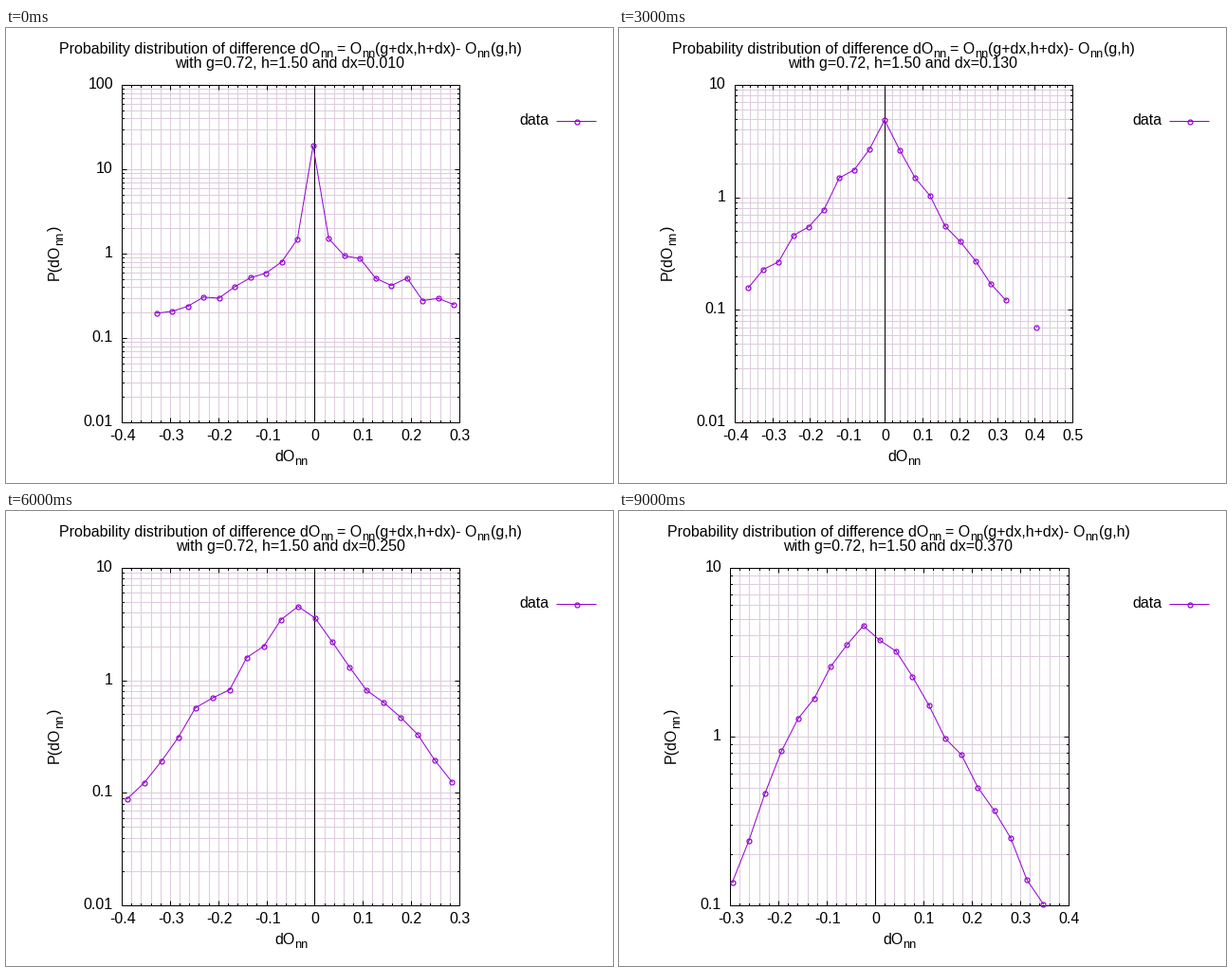
Recreate the animation shown at these times as a matplotlib script. Size 640 px wide and 480 px high, loop 10000 ms.

```python
import math
import random

import matplotlib.pyplot as plt
from matplotlib.animation import FuncAnimation

W, H, DPI = 640, 480, 80
PX = 72 / DPI                       # one pixel in points
TOP, BOTTOM, BINS = 60, 416, 20
GRID, VIOLET = "#ddccdd", "#9400d3"

# First bin, last bin, log10 of P at both, lowest decade shown
RUNS = [
    (-0.329, 0.288, -0.70, -0.60, -2),
    (-0.519, 0.352, -1.25, -1.09, -2),
    (-0.368, 0.364, -1.00, -1.00, -2),
    (-0.365, 0.402, -0.80, -1.15, -2),
    (-0.404, 0.307, -0.96, -0.81, -1),
    (-0.391, 0.393, -1.09, -1.17, -2),
    (-0.390, 0.284, -1.05, -0.90, -2),
    (-0.345, 0.292, -0.90, -0.80, -1),
    (-0.330, 0.360, -1.05, -1.05, -2),
    (-0.296, 0.347, -0.86, -0.99, -1),
]

plt.rcParams["font.family"] = "Liberation Sans"
fig = plt.figure(figsize=(W / DPI, H / DPI), dpi=DPI, facecolor="white")
ax = fig.add_axes([0, 0, 1, 1])


def text(x, y, s, size=16, ha="left", rotation=0):
    ax.text(x, y, s, fontsize=size * PX, ha=ha, va="baseline",
            rotation=rotation, rotation_mode="anchor", color="black")


def sub(x, y, rotation=0):
    text(x, y, "nn", 12.8, rotation=rotation)


def pixel(v):
    """Centre of the pixel that holds v."""
    return math.floor(v + 0.5) + 0.5


def vlines(xs, y0, y1, color="black"):
    ax.vlines(xs, y0, y1, colors=color, linewidth=PX, snap=False)


def hlines(ys, x0, x1, color="black"):
    ax.hlines(ys, x0, x1, colors=color, linewidth=PX, snap=False)


def line_points(xs, ys):
    ax.plot(xs, ys, color=VIOLET, lw=PX, snap=False)


def markers(xs, ys):
    ax.plot(xs, ys, "o", ms=5 * PX, mfc="none", mec=VIOLET, mew=1.2 * PX)
    ax.plot(xs, ys, ",", color=VIOLET)


def captions(dx, shift, ylabel_x):
    x = 56 - shift
    text(x, 27, "Probability distribution of difference dO")
    sub(x + 275, 31)
    text(x + 293, 27, "= O")
    sub(x + 319.5, 31)
    text(x + 333, 27, "(g+dx,h+dx)- O")
    sub(x + 440.5, 31)
    text(x + 455, 27, "(g,h)")
    text(299.5 - shift, 42, f"with g=0.72, h=1.50 and dx={dx:.3f}", ha="center")

    text(283 - shift, 457, "dO")
    sub(304.3 - shift, 461)
    text(ylabel_x, 266, "P(dO", rotation=90)
    sub(ylabel_x + 4, 228.7, 90)
    text(ylabel_x, 214.5, ")", rotation=90)


def legend():
    text(541, 102, "data")
    line_points([581, 622], [98.5, 98.5])
    markers([601.5], [98.5])


def axes_box(left, right, xticks, decades):
    (a, b), (lo, hi) = xticks, decades
    top, bottom, l, r = TOP + 0.5, BOTTOM + 0.5, left + 0.5, right + 0.5
    unit, decade = (right - left) / (b - a), (BOTTOM - TOP) / (hi - lo)

    xs = [pixel(left + k * unit / 5) for k in range(5 * (b - a) + 1)]
    ys = [pixel(BOTTOM - (p + math.log10(m)) * decade)
          for p in range(hi - lo) for m in range(1, 10)] + [top]

    vlines(xs, top, bottom, GRID)
    hlines(ys, l, r, GRID)
    for step_x, step_y, size in ((1, 1, 2.5), (5, 9, 5)):
        vlines(xs[::step_x], top, top + size)
        vlines(xs[::step_x], bottom - size, bottom)
        hlines(ys[::step_y], l, l + size)
        hlines(ys[::step_y], r - size, r)
    vlines([l, r, pixel(left - a * unit)], TOP, BOTTOM + 1)
    hlines([top, bottom], left, right + 1)

    for k, x in zip(range(a, b + 1), xs[::5]):
        text(x + 0.3, 435, f"{k / 10:g}", ha="center")
    for p, y in zip(range(lo, hi + 1), ys[::9]):
        text(left - 9, y + 3.5, f"{10.0 ** p:g}", ha="right")


def histogram(i, dx):
    """Bin centres and log10 of P: a cusp that rounds off as dx grows."""
    first, last, left_end, right_end, _ = RUNS[i]
    rng = random.Random(i)
    xs = [first + k * (last - first) / (BINS - 1) for k in range(BINS)]
    centre = min(xs, key=lambda x: abs(x + 0.005 + 0.08 * dx))
    peak = 0.66 + 0.8 * math.exp(-dx / 0.04)
    power = 2 * dx ** 0.45

    levels = []
    for x in xs:
        edge, end = (first, left_end) if x < centre else (last, right_end)
        r = (x - centre) / (edge - centre)
        noise = 0.25 * r * (1 - r) * rng.gauss(0, 1)
        levels.append(peak + (end - peak) * r ** power + noise)

    # A single event far out has an empty bin beside it
    if left_end < -1.1:
        levels[1] = math.nan
    if right_end < -1.1:
        levels[-2] = math.nan
    return xs, levels, peak


def draw(i):
    ax.cla()
    ax.set(xlim=(0, W), ylim=(H, 0))
    ax.axis("off")

    dx = 0.01 + 0.04 * i
    xs, levels, peak = histogram(i, dx)
    a, b = math.floor(10 * xs[0]), math.ceil(10 * xs[-1])
    lo, hi = RUNS[i][-1], math.ceil(peak)
    narrow = lo == -1               # shorter labels move the plot left
    left, right = (117, 474) if narrow else (122, 478)
    axes_box(left, right, (a, b), (lo, hi))

    px = [left + 0.5 + (10 * x - a) * (right - left) / (b - a) for x in xs]
    py = [BOTTOM + 0.5 - (v - lo) * (BOTTOM - TOP) / (hi - lo) for v in levels]
    line_points(px, py)
    markers(px, py)

    captions(dx, 5 if narrow else 0, 60 if narrow else 56)
    legend()
    return []


anim = FuncAnimation(fig, draw, frames=len(RUNS), interval=1000, repeat=True)
plt.show()
```
